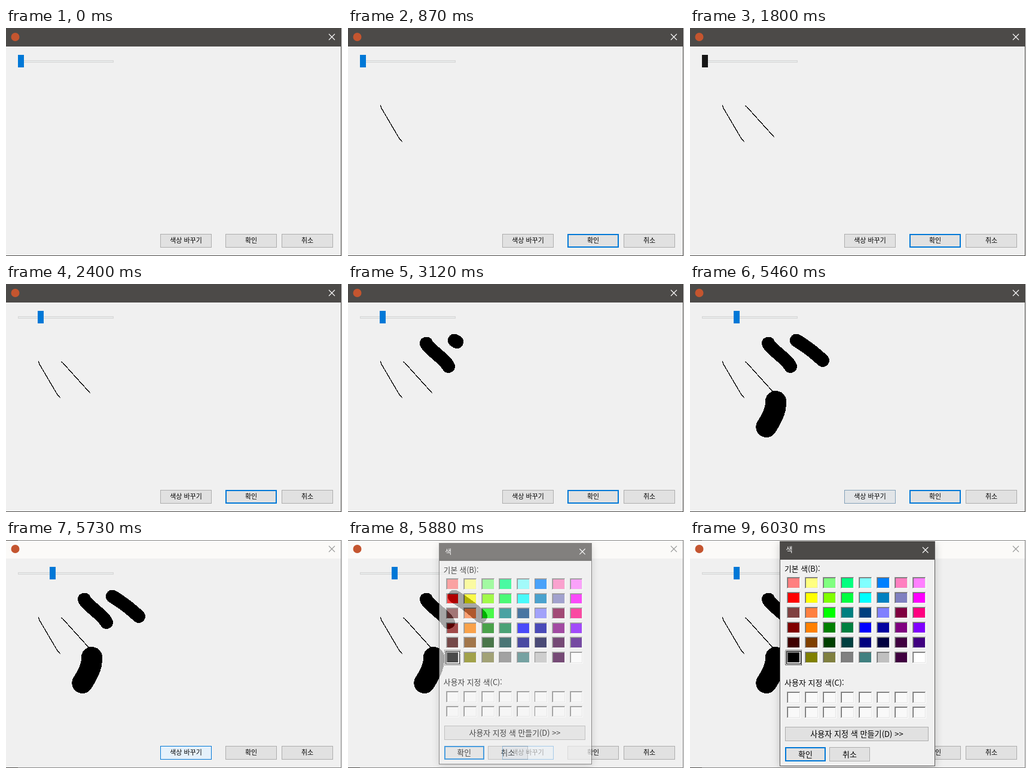
Animation, 562 px wide and 382 px high, one loop 8 s. Source, as an HTML page:

```html
<!DOCTYPE html>
<html lang="ko">
<head>
<meta charset="utf-8">
<title>Paint dialog</title>
<style>
  html, body { margin: 0; width: 100%; height: 100%; overflow: hidden; background: #f0f0f0; }
  svg { display: block; width: 562px; height: 382px; }
  rect, line, path { shape-rendering: crispEdges; }
  text { font-family: "Noto Sans CJK KR", "Noto Sans CJK", "Noto Sans CJK JP", sans-serif; fill: #000; }
  .ink { fill: none; stroke: #000; stroke-linecap: round; stroke-linejoin: round; }
  .cross { stroke-width: 1.1; fill: none; shape-rendering: auto; }
  .shadow { filter: drop-shadow(0 3px 7px rgba(0, 0, 0, .2)); }
</style>
</head>
<body>
<svg id="stage" viewBox="0 0 562 382"></svg>
<script>
const LOOP = 8000, STEP = 30;
const BLUE = '#0078d7', DARK = '#4c4a48', FACE = '#f0f0f0', HOT = '#171717';
const stage = document.getElementById('stage');

function add(parent, tag, attrs, text) {
  const el = document.createElementNS('http://www.w3.org/2000/svg', tag);
  set(el, attrs);
  if (text) el.textContent = text;
  parent.appendChild(el);
  return el;
}
function set(el, attrs) {
  for (const key in attrs) el.setAttribute(key, attrs[key]);
}
function box(parent, x, y, width, height, fill) {
  return add(parent, 'rect', { x, y, width, height, fill });
}
function label(parent, x, y, size, text, attrs = {}) {
  return add(parent, 'text', { x, y, 'font-size': size, ...attrs }, text);
}
function cross(parent, x, y, size, stroke) {
  const d = `M${x} ${y}l${size} ${size}m0 ${-size}l${-size} ${size}`;
  return add(parent, 'path', { d, stroke, class: 'cross' });
}
function button(parent, x, y, w, h, size, text) {
  const edge = box(parent, x, y, w, h);
  const face = box(parent, x, y, w, h);
  label(parent, x + w / 2, y + h / 2 + size * 0.36, size, text, { 'text-anchor': 'middle' });
  return (fill = '#e1e1e1', line = '#adadad', b = 1) => {
    set(edge, { fill: line });
    set(face, { x: x + b, y: y + b, width: w - 2 * b, height: h - 2 * b, fill });
  };
}

// Main window
box(stage, 0, 0, 562, 382, '#e4e4e4');
const frame = box(stage, 0, 0, 561, 382, DARK);
const title = box(stage, 0, 1, 560, 30, DARK);
box(stage, 0, 0, 20, 1, DARK);
box(stage, 0, 381, 20, 1, DARK);
box(stage, 0, 31, 560, 350, FACE);
add(stage, 'circle', { cx: 15.5, cy: 15, r: 7, fill: '#c4552f' });
const close = cross(stage, 540, 10, 10, '#fff');

box(stage, 20, 54, 160, 4, '#d6d6d6');
box(stage, 21, 55, 158, 2, '#e7eaea');
const thumb = box(stage, 20, 45, 10, 21, BLUE);

const colorBtn = button(stage, 258, 345, 86, 23, 11, '색상 바꾸기');
const okBtn = button(stage, 367, 345, 86, 23, 11, '확인');
button(stage, 461, 345, 86, 23, 11, '취소')();

// Pen strokes: start time, width, path
const strokes = [
  [720, 1.3, 'M54.5 129.5L55.5 133.5L74.5 166L85.5 184.5L90.5 190.5'],
  [1110, 1.3, 'M92.5 130.5L94.5 131.5L140.5 182.5'],
  [2610, 22, 'M131 99.5Q134 105 141 111T158 126Q165 132 168 138'],
  [3120, 22, 'M178 94.5L182 97Q204 111 222 128'],
  [4650, 35, 'M143.5 196.5Q144 208 139 219T127.8 239.5']
].map(([start, width, d]) => ({
  start,
  el: add(stage, 'path', { d, class: 'ink', 'stroke-width': width, pathLength: 1 })
}));
const DRAWN = [0.09, 0.28, 0.5, 0.72, 0.9, 1];

// Colour dialog
const dialog = add(stage, 'g', {});
set(box(dialog, 150, 2, 260, 377, '#5c5b5a'), { class: 'shadow' });
box(dialog, 151, 2, 258, 31, DARK);
box(dialog, 151, 33, 258, 345, FACE);
label(dialog, 160.5, 21, 12, '색', { style: 'fill:#fff' });
cross(dialog, 389, 12, 9.5, '#fff');
label(dialog, 158, 52.5, 12.8, '기본 색(B):');
label(dialog, 158, 243.5, 13, '사용자 지정 색(C):');

// Sunken colour cell
function well(col, y, fill) {
  const x = 162 + col * 30;
  box(dialog, x, y, 23, 20, '#fff');
  box(dialog, x, y, 22, 19, '#a0a0a0');
  box(dialog, x + 1, y + 1, 21, 18, '#e3e3e3');
  box(dialog, x + 1, y + 1, 20, 17, '#696969');
  box(dialog, x + 2, y + 2, 19, 16, fill);
}

// Selection marks
box(dialog, 161, 186, 25, 22, '#000');
add(dialog, 'rect', {
  x: 159.5, y: 184.5, width: 27, height: 25,
  fill: 'none', stroke: '#000', 'stroke-dasharray': '1 1'
});

// One hex digit per channel: F = ff, others = digit followed by 0
const palette = [
  'F88 FF8 8F8 0F8 8FF 08F F8C F8F',
  'F00 FF0 8F0 0F4 0FF 08C 88C F0F',
  '844 F84 0F0 088 048 88F 804 F08',
  '800 F80 080 084 00F 00A 808 80F',
  '400 840 040 044 008 004 404 408',
  '000 880 884 888 488 CCC 404 FFF'
];
palette.forEach((row, r) => row.split(' ').forEach((code, c) => {
  const hex = [...code].map(ch => ch === 'F' ? 'ff' : ch + '0').join('');
  well(c, 62 + r * 25, '#' + hex);
}));
for (const y of [254, 279])
  for (let c = 0; c < 8; c++) well(c, y, '#f9f9f9');

button(dialog, 159, 313, 240, 24, 13.1, '사용자 지정 색 만들기(D) >>')();
button(dialog, 159, 347, 68, 24, 13, '확인')(undefined, BLUE, 2);
button(dialog, 233, 347, 68, 24, 13, '취소')();

const clamp = v => Math.max(0, Math.min(1, v));
const smooth = v => v * v * (3 - 2 * v);
const part = (t, from, to) => clamp((t - from) / (to - from));
function mix(a, b, k) {
  return `rgb(${a.map((v, i) => Math.round(v + (b[i] - v) * k)).join()})`;
}

// Thumb states: time, colour
const thumbColors = [
  [0, BLUE], [1800, HOT], [1950, '#cccccc'], [2370, HOT], [2400, BLUE],
  [3780, HOT], [3960, '#cccccc'], [4230, HOT], [4260, BLUE]
];

function render(time) {
  const t = Math.floor(time / STEP) * STEP;

  for (const { start, el } of strokes) {
    const i = Math.min(DRAWN.length - 1, (t - start) / STEP);
    el.style.visibility = i < 0 ? 'hidden' : 'visible';
    if (i >= 0) el.style.strokeDasharray = i < 5 ? `${DRAWN[i]} 2` : 'none';
  }

  const shift = 33 * smooth(part(t, 1950, 2220)) + 20 * smooth(part(t, 3960, 4080));
  const color = thumbColors.filter(s => s[0] <= t).pop()[1];
  set(thumb, { x: 20 + Math.round(shift), fill: color });

  const pressed = t >= 5610 && t < 5700;
  const hover = part(t, 5430, 5550);
  if (pressed) colorBtn('#cce4f7', '#005499');
  else colorBtn(mix([225, 225, 225], [229, 241, 251], hover),
                mix([173, 173, 173], [0, 120, 215], hover));
  if (t >= 720 && t < 5610) okBtn(undefined, BLUE, 2);
  else okBtn();

  const active = t < 5730;
  set(frame, { fill: active ? DARK : '#858585' });
  set(title, { fill: active ? DARK : '#fbfaf8' });
  set(close, { stroke: active ? '#fff' : '#999' });

  const open = 1 - (1 - part(t, 5760, 6030)) ** 2;
  const scale = 0.95 + 0.05 * open;
  dialog.style.display = open > 0 ? '' : 'none';
  set(dialog, {
    opacity: open,
    transform: `translate(280 190) scale(${scale}) translate(-280 -190)`
  });
}

const begin = performance.now();
function tick() {
  render((performance.now() - begin) % LOOP);
  requestAnimationFrame(tick);
}
tick();
</script>
</body>
</html>
```
